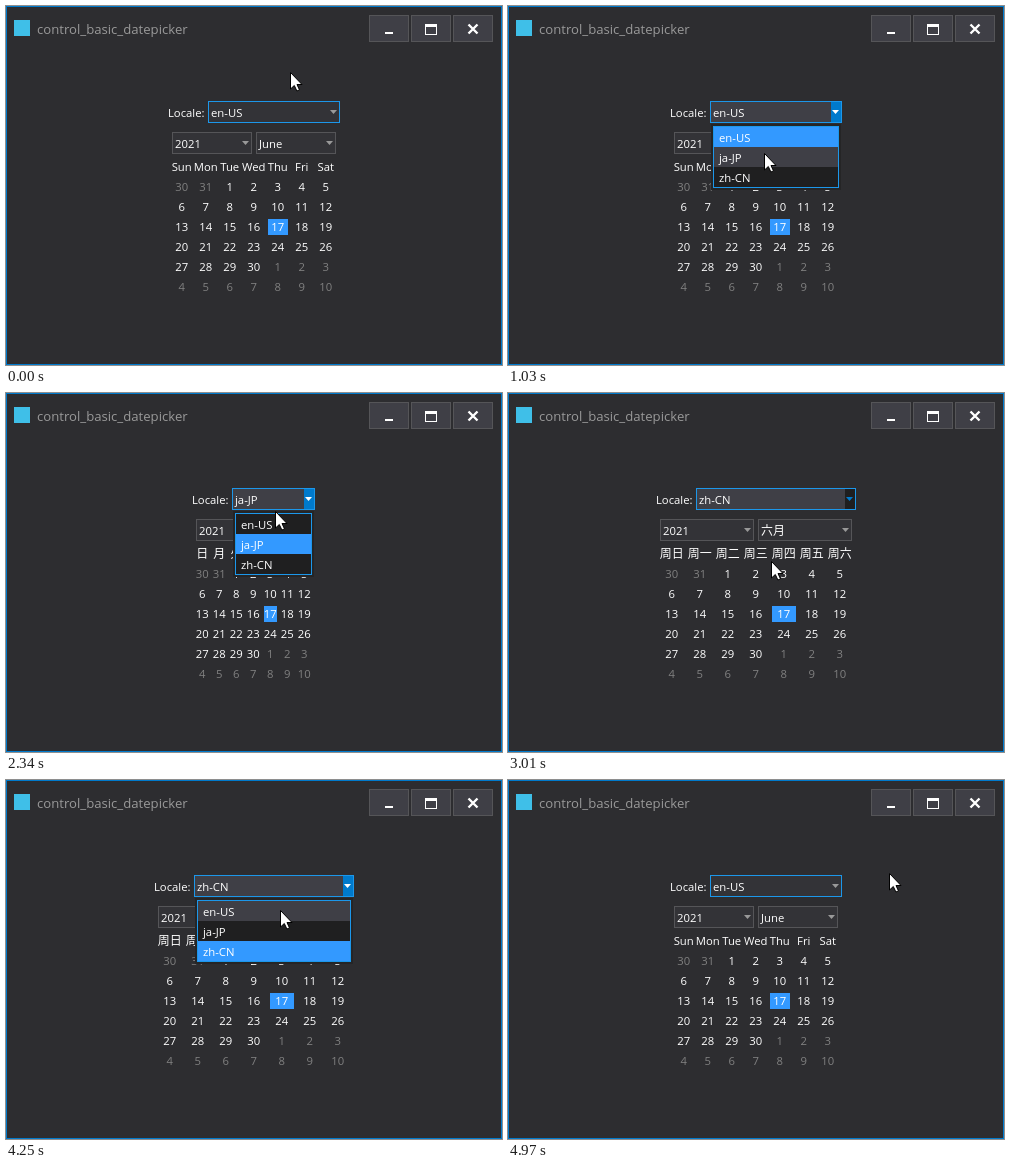
These frames come from a looping animation (496x359 px, 5.33 s). An HTML page with a canvas:

```html
<!DOCTYPE html>
<html lang="en">
<head>
<meta charset="utf-8">
<title>Date picker</title>
<style>
  html, body { margin: 0; width: 100%; height: 100%; overflow: hidden; background: #2d2d30; }
  canvas { display: block; }
</style>
</head>
<body>
<canvas id="stage" width="496" height="359"></canvas>
<script>
const ctx = document.getElementById('stage').getContext('2d');
const LOOP = 5330;
const SANS = '"Open Sans", "Noto Sans CJK JP", "Noto Sans CJK SC", "Noto Sans CJK", sans-serif';
const UI_FONT = '11.3px ' + SANS;
const CJK_FONT = '12px "Noto Sans CJK JP", "Noto Sans CJK SC", "Noto Sans CJK", sans-serif';
const C = {
  bg: '#2d2d30', field: '#333337', hover: '#3f3f46', dark: '#1f1f20', popup: '#252526',
  line: '#555558', focus: '#1c97ea', accent: '#007acc', pick: '#3399ff',
  text: '#ffffff', dim: '#808080', arrow: '#999999'
};

const LOCALES = {
  'en-US': { box: [202, 132], cal: [166, 164], first: 175.7, pitch: 24, pickW: 20,
             month: 'June', days: ['Sun', 'Mon', 'Tue', 'Wed', 'Thu', 'Fri', 'Sat'], font: UI_FONT },
  'ja-JP': { box: [226, 83], cal: [190, 114], first: 196.3, pitch: 17, pickW: 13,
             month: '6月', days: [...'日月火水木金土'], font: CJK_FONT },
  'zh-CN': { box: [188, 160], cal: [152, 192], first: 163.8, pitch: 28, pickW: 24,
             month: '六月', days: [...'日一二三四五六'].map(d => '周' + d), font: CJK_FONT }
};
const NAMES = Object.keys(LOCALES);

// Pointer moves: start, end, number of steps, destination x and y.
const MOVES = [
  [120, 490, 8, 272, 105],
  [780, 1030, 7, 256, 147],
  [1360, 1510, 4, 264, 126],
  [1560, 1720, 4, 269, 106],
  [2180, 2340, 4, 269, 118],
  [2390, 2630, 6, 264, 169],
  [2670, 2670, 1, 263, 173],
  [2840, 2840, 1, 263, 168],
  [3230, 3550, 9, 275, 106],
  [3930, 4250, 6, 274, 130],
  [4610, 4970, 9, 381, 93]
];

// Locale box states: time, locale, state.
const STATES = [
  [0, 'en-US', 'normal'], [430, 'en-US', 'hover'], [545, 'en-US', 'pressed'], [600, 'en-US', 'open'],
  [1310, 'ja-JP', 'hover'], [1400, 'ja-JP', 'normal'], [1660, 'ja-JP', 'hover'],
  [1990, 'ja-JP', 'pressed'], [2130, 'ja-JP', 'open'],
  [2900, 'zh-CN', 'hover'], [3590, 'zh-CN', 'pressed'], [3870, 'zh-CN', 'open'],
  [4565, 'en-US', 'hover'], [4655, 'en-US', 'normal']
];

function pointerAt(t) {
  let x = 284, y = 66;
  for (const [start, end, steps, toX, toY] of MOVES) {
    if (t < start) break;
    const step = steps > 1 ? Math.floor((t - start) / (end - start) * (steps - 1) + 1e-6) + 1 : 1;
    const p = Math.min(1, step / steps);
    x += (toX - x) * p;
    y += (toY - y) * p;
  }
  return [Math.round(x), Math.round(y)];
}

function rect(x, y, w, h, fill) {
  ctx.fillStyle = fill;
  ctx.fillRect(x, y, w, h);
}

function frame(x, y, w, h, fill, border) {
  rect(x, y, w, h, border);
  rect(x + 1, y + 1, w - 2, h - 2, fill);
}

function text(s, x, y, color = C.text, align = 'left', font = UI_FONT) {
  ctx.font = font;
  ctx.textAlign = align;
  ctx.fillStyle = color;
  ctx.fillText(s, x, y);
}

function polygon(points, fill) {
  ctx.beginPath();
  points.forEach(([x, y]) => ctx.lineTo(x, y));
  ctx.closePath();
  ctx.fillStyle = fill;
  ctx.fill();
}

function downArrow(x, y, color) {
  polygon([[x - 3.5, y - 2], [x + 3.5, y - 2], [x, y + 2]], color);
}

function windowChrome() {
  frame(0, 0, 496, 359, C.bg, C.accent);
  rect(8, 14, 16, 16, '#3fbfe8');
  text('control_basic_datepicker', 31, 28, '#999999', 'left', '13.15px ' + SANS);
  for (const x of [363, 405, 447]) frame(x, 9, 40, 27, C.hover, C.line);
  rect(379, 26, 8, 2, C.text);
  rect(419, 18, 12, 11, C.text);
  rect(420, 21, 10, 7, C.hover);
  ctx.strokeStyle = C.text;
  ctx.lineWidth = 2.4;
  ctx.beginPath();
  ctx.moveTo(462.5, 18.5); ctx.lineTo(471.5, 27.5);
  ctx.moveTo(471.5, 18.5); ctx.lineTo(462.5, 27.5);
  ctx.stroke();
}

function combo(x, y, w, label, font) {
  frame(x, y, w, 22, C.field, C.line);
  text(label, x + 3, y + 16, C.text, 'left', font);
  downArrow(x + w - 6.5, y + 11, C.arrow);
}

function calendar(loc) {
  const [x, w] = loc.cal, half = (w - 4) / 2;
  combo(x, 126, half, '2021');
  combo(x + half + 4, 126, half, loc.month, loc.font);
  loc.days.forEach((d, i) => text(d, loc.first + loc.pitch * i, 165, C.text, 'center', loc.font));
  for (let i = 0; i < 42; i++) {
    const cx = loc.first + loc.pitch * (i % 7), y = 185 + 20 * Math.floor(i / 7);
    const n = i - 1, inMonth = n >= 1 && n <= 30;
    if (n === 17) rect(Math.round(cx - loc.pickW / 2), 213, loc.pickW, 16, C.pick);
    text(n < 1 ? n + 31 : n > 30 ? n - 30 : n, cx, y, inMonth ? C.text : C.dim, 'center');
  }
}

function localeBox(name, state) {
  const [x, w] = LOCALES[name].box;
  const active = state !== 'normal', down = state === 'pressed' || state === 'open';
  text('Locale:', x - 3.5, 111, C.text, 'right');
  frame(x, 95, w, 22, active ? C.hover : C.field, C.focus);
  if (active) rect(x + w - 11, 96, 10, 20, down ? C.accent : C.dark);
  text(name, x + 3, 111);
  downArrow(x + w - 6.5, 106, down ? C.text : active ? C.accent : C.arrow);
}

function popup(name, pointerY) {
  const [x, w] = LOCALES[name].box;
  rect(x + 1, 118, w - 2, 66, C.popup);
  frame(x + 3, 120, w - 6, 62, C.dark, C.focus);
  NAMES.forEach((item, i) => {
    const y = 121 + 20 * i;
    const over = pointerY >= y && pointerY < y + 20;
    if (item === name) rect(x + 4, y, w - 8, 20, C.pick);
    else if (over) rect(x + 4, y, w - 8, 20, C.hover);
    text(item, x + 9, y + 15);
  });
}

function pointer(x, y) {
  const shape = [[0, 0], [0, 16.5], [3.8, 13], [6.4, 18.5], [9, 17.4], [6.5, 12], [11.5, 12]];
  polygon(shape.map(([dx, dy]) => [x + dx + 0.5, y + dy + 0.5]), C.text);
  ctx.strokeStyle = '#000000';
  ctx.lineWidth = 1;
  ctx.stroke();
}

function draw(now) {
  const t = now % LOOP;
  const [, name, state] = STATES.filter(s => s[0] <= t).pop();
  const [x, y] = pointerAt(t);
  windowChrome();
  calendar(LOCALES[name]);
  localeBox(name, state);
  if (state === 'open') popup(name, y);
  pointer(x, y);
}

const startTime = performance.now();
function tick() {
  draw(performance.now() - startTime);
  requestAnimationFrame(tick);
}
tick();
</script>
</body>
</html>
```
